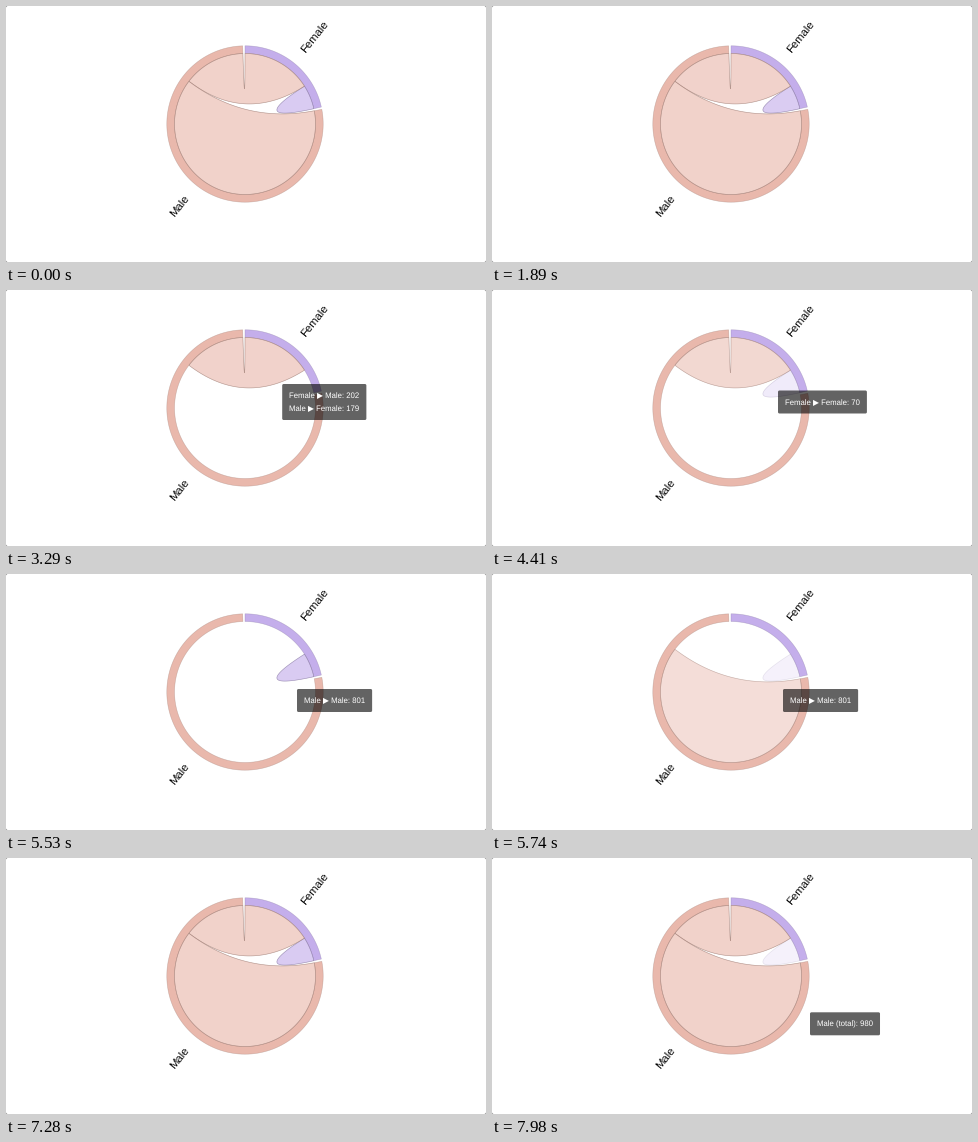
A matplotlib script for the animation above (8 s loop, 480x256 px).

```python
import numpy as np
import matplotlib
import matplotlib.pyplot as plt
from matplotlib.animation import FuncAnimation
from matplotlib.colors import to_rgb
from matplotlib.patches import FancyBboxPatch, Polygon

matplotlib.rcParams["font.family"] = ["Liberation Sans", "DejaVu Sans"]
matplotlib.rcParams["text.hinting"] = "none"

W, H, DPI = 480, 256, 64
LOOP, INTERVAL, STEP = 8000, 20, 70
PT = 72 / DPI  # points per pixel

CX, CY = 239, 118
R_OUT, R_IN, R_LABEL = 78.2, 70.5, 92.5
PAD = 0.03
FADE = 250
LABEL_SIZE, TIP_SIZE, TIP_PAD, LINE_H = 11.2, 7.8, 7, 13

FEMALE, MALE = "#c4aeeb", "#e9b8ac"
FLOW = {"ff": 70, "fm": 202, "mm": 801, "mf": 179}

# (start ms, opacity to reach) for each ribbon
FADES = {
    "ff": [(1870, 0), (4295, 1), (5590, 0), (6310, 1), (7830, 0)],
    "fm": [(1870, 0), (3060, 1), (4330, 0), (6300, 1)],
    "mm": [(3060, 0), (5590, 1)],
}

# (from ms, to ms, left, top, lines)
TIPS = [
    (3150, 4340, 276.2, 94, ["Female ▶ Male: 202", "Male ▶ Female: 179"]),
    (4340, 5530, 286, 100.5, ["Female ▶ Female: 70"]),
    (5530, 6300, 291, 115, ["Male ▶ Male: 801"]),
    (7840, LOOP, 318, 154.3, ["Male (total): 980"]),
]

fig = plt.figure(figsize=(W / DPI, H / DPI), dpi=DPI, facecolor="#8a8a8a")
ax = fig.add_axes([0, 0, 1, 1])
ax.set_xlim(0, W)
ax.set_ylim(H, 0)
ax.axis("off")


def polar(angle, r):
    """Point at an angle measured clockwise from the top."""
    return np.column_stack([CX + r * np.sin(angle), CY - r * np.cos(angle)])


def arc(a0, a1, r):
    return polar(np.linspace(a0, a1, 120), r)


def curve(p, q):
    """Quadratic curve from p to q, pulled to the centre."""
    t = np.linspace(0, 1, 50)[:, None]
    return (1 - t) ** 2 * p + 2 * t * (1 - t) * np.array([CX, CY]) + t ** 2 * q


def darker(color):
    return tuple(0.7 * c for c in to_rgb(color))


def ring(span, color):
    pts = np.vstack([arc(*span, R_OUT), arc(*span[::-1], R_IN)])
    ax.add_patch(Polygon(pts, fc=color, ec=darker(color) + (0.45,),
                         lw=0.6 * PT, zorder=1))


def ribbon(spans, color):
    arcs = [arc(*s, R_IN) for s in spans]
    parts = []
    for i, a in enumerate(arcs):
        parts += [a, curve(a[-1], arcs[(i + 1) % len(arcs)][0])]
    patch = Polygon(np.vstack(parts), lw=0.6 * PT, zorder=2)
    patch.color = color
    return ax.add_patch(patch)


def label(text, angle, ha):
    tilt = np.pi / 2 - angle % np.pi
    x, y = polar(np.array([angle]), R_LABEL)[0]
    drop = 0.35 * LABEL_SIZE
    ax.text(x + drop * np.sin(tilt), y + drop * np.cos(tilt), text,
            rotation=np.degrees(tilt), rotation_mode="anchor",
            ha=ha, va="baseline", fontsize=LABEL_SIZE * PT, color="black")


def tooltip(x, y, lines):
    texts = [ax.text(x + TIP_PAD, y + 14.3 + i * LINE_H, s, color="white",
                     fontsize=TIP_SIZE * PT, va="baseline", zorder=6)
             for i, s in enumerate(lines)]
    renderer = fig.canvas.get_renderer()
    width = max(t.get_window_extent(renderer).width for t in texts)
    box = FancyBboxPatch((x, y), width + 2 * TIP_PAD,
                         23 + LINE_H * (len(lines) - 1),
                         boxstyle="round,pad=0,rounding_size=1.5",
                         fc=(0, 0, 0, 0.61), ec="none", zorder=5)
    return [ax.add_patch(box), *texts]


def ease(x):
    x = min(max(x, 0), 1)
    return 4 * x ** 3 if x < 0.5 else 1 - 4 * (1 - x) ** 3


def opacity(fades, t):
    value = 1
    for start, goal in fades:
        value += (goal - value) * ease((t - start) / FADE)
    return value


# Window with slightly rounded corners
ax.add_patch(FancyBboxPatch((0, 0), W, H, fc="white", ec="none", zorder=0,
                            boxstyle="round,pad=0,rounding_size=2"))

unit = (2 * np.pi - 2 * PAD) / sum(FLOW.values())
f_mid = FLOW["fm"] * unit
f_end = f_mid + FLOW["ff"] * unit
m_start = f_end + PAD
m_mid = m_start + FLOW["mm"] * unit
m_end = m_mid + FLOW["mf"] * unit

ring((0, f_end), FEMALE)
ring((m_start, m_end), MALE)
label("Female", f_end / 2, "left")
label("Male", (m_start + m_end) / 2, "right")

ribbons = {
    "ff": ribbon([(f_mid, f_end)], FEMALE),
    "fm": ribbon([(0, f_mid), (m_mid, m_end)], MALE),
    "mm": ribbon([(m_start, m_mid)], MALE),
}
tips = [(t0, t1, tooltip(*rest)) for t0, t1, *rest in TIPS]


def update(i):
    t = (i * INTERVAL + INTERVAL // 2) // STEP * STEP
    for key, patch in ribbons.items():
        o = opacity(FADES[key], t)
        patch.set_facecolor(to_rgb(patch.color) + (0.63 * o,))
        patch.set_edgecolor(darker(patch.color) + (0.8 * o,))
        patch.set_visible(o > 0.002)
    for t0, t1, artists in tips:
        for a in artists:
            a.set_visible(t0 <= t < t1)
    return []


anim = FuncAnimation(fig, update, frames=LOOP // INTERVAL, interval=INTERVAL,
                     repeat=True, repeat_delay=0, blit=False)
plt.show()
```
